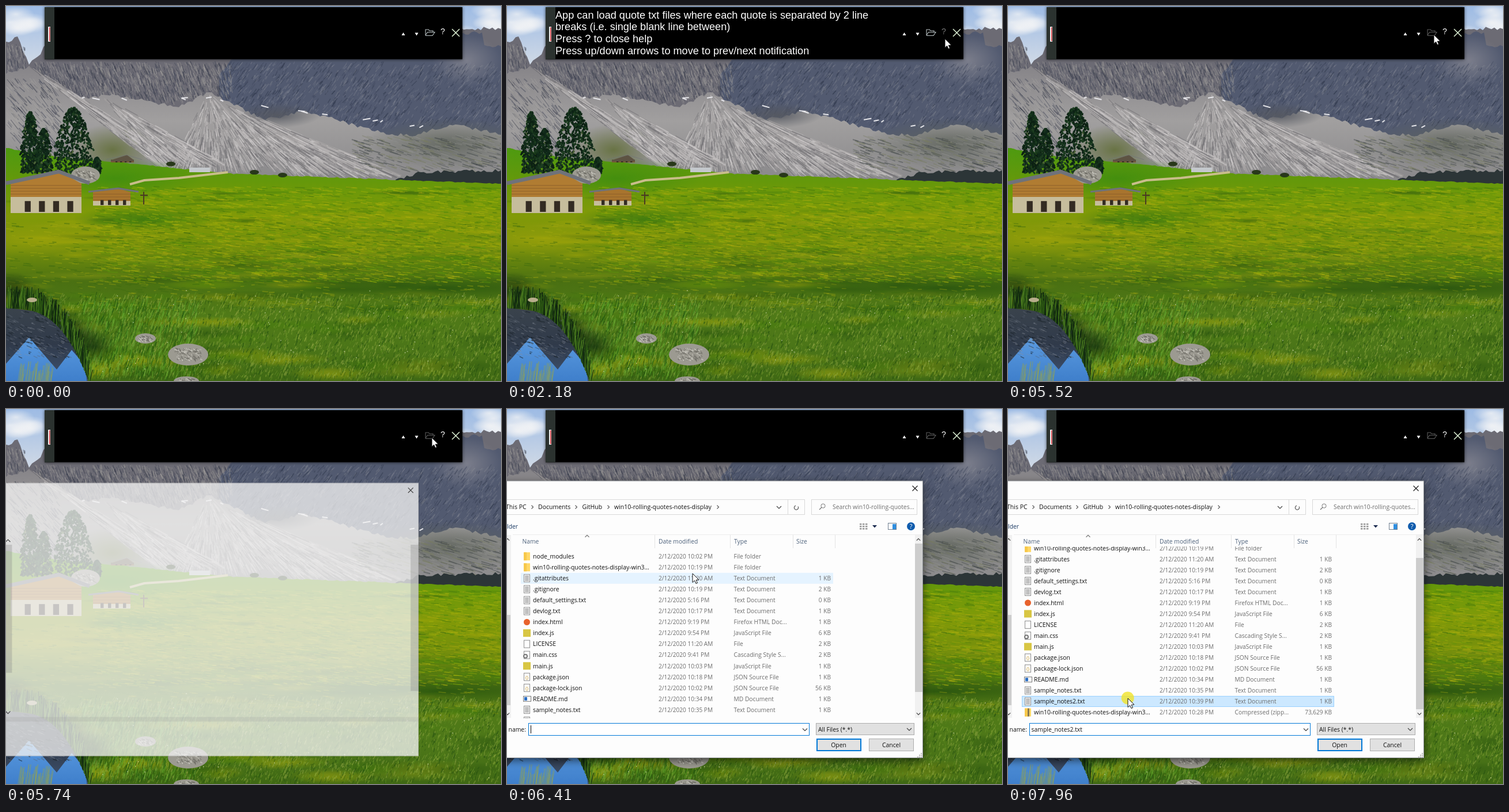
An HTML page with a canvas for the animation above (8 s loop, 859x652 px).

```html
<!DOCTYPE html>
<html lang="en">
<head>
<meta charset="utf-8">
<title>Rolling quotes</title>
<style>
html, body { margin: 0; width: 100%; height: 100%; overflow: hidden; background: #000; }
canvas { display: block; }
</style>
</head>
<body>
<canvas id="stage" width="859" height="652"></canvas>
<script>
const W = 859, H = 652, LOOP = 8000;
let g = document.getElementById('stage').getContext('2d');

let seed = 7;
const rnd = () => (seed = (seed * 16807) % 2147483647) / 2147483647;
const span = (a, b) => a + (b - a) * rnd();
const pick = list => list[Math.floor(rnd() * list.length)];

function rect(x, y, w, h, color) { g.fillStyle = color; g.fillRect(x, y, w, h); }
function frame(x, y, w, h, color, lw = 1) {
  g.strokeStyle = color; g.lineWidth = lw;
  g.strokeRect(x + lw / 2, y + lw / 2, w - lw, h - lw);
}
function box(x, y, w, h, fill, edge, lw) { rect(x, y, w, h, fill); frame(x, y, w, h, edge, lw); }
function trace(pts) {
  g.beginPath();
  for (let i = 0; i < pts.length; i += 2) g.lineTo(pts[i], pts[i + 1]);
}
function poly(color, ...pts) { trace(pts); g.closePath(); g.fillStyle = color; g.fill(); }
function line(color, lw, ...pts) { trace(pts); g.strokeStyle = color; g.lineWidth = lw; g.stroke(); }
function blob(color, x, y, rx, ry = rx) {
  g.beginPath(); g.ellipse(x, y, rx, ry, 0, 0, 7); g.fillStyle = color; g.fill();
}
function ring(color, lw, x, y, r, a = 0, b = 7) {
  g.beginPath(); g.arc(x, y, r, a, b); g.strokeStyle = color; g.lineWidth = lw; g.stroke();
}
function text(s, x, y, size, color, align = 'left', family = '"Open Sans"') {
  g.font = `${size}px ${family}, sans-serif`;
  g.fillStyle = color; g.textAlign = align; g.fillText(s, x, y);
}
function fade(y0, y1, ...colors) {
  const f = g.createLinearGradient(0, y0, 0, y1);
  colors.forEach((c, i) => f.addColorStop(i / (colors.length - 1), c));
  return f;
}
// soft-edged ellipse
function glow(rgb, a, x, y, rx, ry) {
  g.save(); g.translate(x, y); g.scale(rx, ry);
  const f = g.createRadialGradient(0, 0, 0, 0, 0, 1);
  f.addColorStop(0, `rgba(${rgb},${a})`); f.addColorStop(1, `rgba(${rgb},0)`);
  g.fillStyle = f; g.fillRect(-1, -1, 2, 2); g.restore();
}
// rough skyline through a few points, filled downwards
function ridge(color, rough, ...pts) {
  const edge = [0, H];
  for (let i = 2; i < pts.length; i += 2) {
    const [x0, y0, x1, y1] = pts.slice(i - 2, i + 2), n = Math.ceil((x1 - x0) / 5);
    for (let k = 0; k <= n; k++) {
      edge.push(x0 + (x1 - x0) * k / n, y0 + (y1 - y0) * k / n + (k % n ? span(-rough, rough) : 0));
    }
  }
  poly(color, pts[0], H, ...edge.slice(2), W, H);
}
// short strokes scattered in a box, all leaning by (dx, dy)
function strokes(n, x0, y0, x1, y1, dx, dy, colors) {
  while (n--) {
    const x = span(x0, x1), y = span(y0, y1), k = span(.3, 1);
    line(pick(colors), span(.7, 2), x, y, x + dx * k + span(-2, 2), y + dy * k + span(-1, 1));
  }
}
// gravel running from a towards b, fanning out
function flow(n, ax, ay, bx, by, spread, colors) {
  while (n--) {
    const ex = bx + span(-spread, spread), k = Math.sqrt(rnd()) * .9, j = span(-3, 3);
    const at = q => [ax + (ex - ax) * q + j, ay + (by - ay) * q];
    line(pick(colors), span(.8, 2.2), ...at(k), ...at(k + .1));
  }
}
function layer(draw) {
  const c = document.createElement('canvas'), old = g;
  c.width = W; c.height = H;
  g = c.getContext('2d'); draw(); g = old;
  return c;
}

const rock = ['#93918f77', '#35394877', '#a8a5a266', '#4d515f88'];
const shade = ['#7a808f66', '#2f374a77', '#8a8d9555', '#444b6188'];
const gravel = ['#cfcccb99', '#77757899', '#b9b6b599', '#a3a0a099'];

function mountains() {
  rect(0, 0, W, 130, fade(0, 100, '#9dbbe4', '#cfd9e6'));
  for (let i = 0; i < 14; i++) glow('240,242,245', .8, i % 2 ? span(0, 60) : span(790, W), span(5, 50), 32, 14);
  glow('80,155,235', .9, 850, 63, 35, 9);
  ridge('#6c6b74', 4, 0, 62, 20, 53, 40, 102, 60, 84, 80, 40, W, 40);
  ridge('#525a70', 3, 370, 120, 420, 60, 770, 48, 826, 46, 830, 68, W, 70);
  glow('140,140,150', .7, 800, 95, 60, 45);
  strokes(1500, 45, 96, 390, 160, 5, 14, rock);
  strokes(1500, 390, 96, W, 205, -8, 11, shade);
  strokes(100, 2, 66, 34, 112, 3, 14, rock);

  ridge(fade(100, 300, '#858387', '#a19f9f', '#8a898b'), 3, 0, 118, 40, 104, 115, 160, 190, 155,
    300, 176, 352, 150, 450, 198, 520, 182, 640, 218, 700, 226, 780, 206, W, 224);
  glow('85,88,96', .9, 470, 190, 75, 22);
  glow('95,100,92', .9, 770, 240, 150, 45);
  strokes(350, 0, 125, 90, 245, 14, 16, rock);
  glow('100,112,60', .9, 185, 250, 75, 45);
  flow(500, 40, 104, 300, 285, 30, gravel);
  flow(900, 352, 152, 390, 292, 110, gravel);
  flow(900, 380, 170, 600, 300, 100, gravel);
  flow(500, 170, 160, 330, 280, 60, gravel);
  strokes(450, 600, 224, W, 285, 22, 7, ['#90908d77', '#484d4c88', '#777d6177']);
  for (let i = 0; i < 16; i++) {
    const x = span(120, 720), y = 160 + Math.max(0, x - 350) * .14;
    line('#e6e6ea', 2, x, y, x + span(4, 14), y + span(-4, 4));
  }
  ridge('#2c3537', 3, 676, 302, 720, 289, W, 286);
}

function meadow() {
  ridge(fade(250, H, '#4f9a10', '#66980a', '#829a08', '#748e0c', '#4a7012', '#507a18', '#4b7518', '#3f6814'),
    1, 0, 247, 90, 262, 240, 276, 380, 291, W, 309);
  // light and dark bands, broader towards the viewer
  for (let i = 0; i < 170; i++) {
    const d = rnd(), y = 312 + 330 * d;
    glow(pick(['165,168,8', '70,125,12', '135,150,20', '40,82,14']), .5, span(0, W), y, span(40, 130), 3 + 10 * d);
  }
  glow('60,140,15', .8, 190, 300, 150, 36);
  glow('46,115,16', .8, 245, 370, 130, 22);
  glow('165,165,10', .5, 70, 405, 230, 32);
  glow('38,82,14', .7, 760, 490, 270, 22);
  strokes(3200, 150, 314, W, 480, 18, 2, ['#a8b40a77', '#45780c77', '#b5b01266', '#5f960c77']);
  strokes(1200, 0, 375, W, 530, 14, 1, ['#a4aa1266', '#3a6a1077']);
  strokes(5200, 90, 505, W, H, 3, -8, ['#8aa83a77', '#25501088', '#5c8a2088', '#a2b25066']);
  strokes(900, 130, 520, 330, H, 5, -18, ['#5ba02a88', '#235a1088', '#7cb34266']);
  for (let i = 0; i < 60; i++) blob('#dfe3c0aa', span(150, 840), span(490, 645), .9);
  for (const x of [286, 431, 480]) blob('#28381a', x, x / 10 + 246, 8, 4);
  line('#c9bd8b', 4, 215, 310, 240, 303, 300, 299, 385, 289);
  rect(318, 281, 36, 8, '#c4c8cc');
}

function tree(x, top, w, bottom) {
  const h = bottom - top;
  for (let i = 0; i < h * 5; i++) {
    const k = rnd(), half = w * Math.sqrt(Math.min(k * 1.6, 1)), px = span(-half, half);
    line(pick(['#0c2013', '#14301a', '#1d3d20', i % 9 ? '#10281a' : '#4d6238']), 3,
      x + px, top + k * h, x + px + span(-4, 4), top + k * h + 4);
  }
}
// gabled cabin; (x, y) is the top left of the walls
function cabin(x, y, w, h, rise, base, wood) {
  rect(x, y, w, h, wood);
  rect(x, y + h - base, w, base, '#c6bd9c');
  for (let i = 4; i < h - base; i += 5) line('#8e612a', 1, x, y + i, x + w, y + i);
  poly(wood, x, y + 1, x + w * .7, y - rise, x + w, y + 1);
  line('#6f727a', h / 8, x - 8, y, x + w * .68, y - rise, x + w + 14, y);
  for (let i = 0; i < 4; i++) rect(x + w * (.2 + i * .2), y + h * .6, w / 12, h * .36, '#332b22');
}
function boulder(x, y, rx, ry) {
  blob('#9c9a91', x, y, rx, ry);
  strokes(rx * 4, x - rx * .7, y - ry * .6, x + rx * .6, y + ry * .5, 4, 3, ['#d0cec699', '#65645e99']);
}
function village() {
  for (const [x, top, w] of [[42, 183, 15], [65, 212, 14], [117, 175, 33], [158, 262, 7]]) tree(x, top, w, 288);
  boulder(138, 294, 25, 15);
  cabin(182, 267, 40, 5, 8, 0, '#5d5343');
  cabin(8, 308, 123, 52, 20, 28, '#b07c32');
  cabin(151, 323, 65, 24, 6, 8, '#a8742e');
  line('#4a3a22', 2, 239, 345, 239, 323); line('#4a3a22', 2, 233, 329, 246, 329);
}

function pond() {
  for (let i = 0; i < 6; i++) glow('20,45,14', .75, 10 + i * 28, 492 + i * 20, 42, 30);
  poly(fade(525, H, '#3a434c', '#303a4a', '#3e5372'), 0, 524, 60, 532, 115, 568, 138, 605, 142, H, 0, H);
  poly(fade(576, H, '#5b9be0', '#3f7fcb'), 0, 622, 40, 576, 88, 632, 114, 598, 138, 626, 140, H, 0, H);
  strokes(220, 0, 530, 105, 610, 9, 4, ['#8b929a66', '#1a232a99', '#5b626f77']);
  for (let i = 0; i < 300; i++) {
    const k = rnd(), x = 145 * k, y = 512 + 130 * k ** 3;
    line(pick(['#2a5413', '#4c7c20', '#173310', '#0f2410']), 1.3, x, y + 14, x + span(-4, 8), y - span(8, 28));
  }
  strokes(50, 20, H, 80, H, 5, -35, ['#8aa06088']);
  blob('#b8ae8c', 45, 511, 9, 4);
  boulder(316, 606, 35, 19); boulder(242, 578, 18, 9); boulder(313, 652, 22, 8);
}

const scene = layer(() => { mountains(); meadow(); village(); pond(); });

function chevron(x, y, r, dir, color = '#444') {
  line(color, 1.2, x - r, y - dir * r / 2, x, y + dir * r / 2, x + r, y - dir * r / 2);
}
function cross(x, y, r, color, lw) {
  line(color, lw, x - r, y - r, x + r, y + r); line(color, lw, x + r, y - r, x - r, y + r);
}

const help = ['App can load quote txt files where each quote is separated by 2 line',
  'breaks (i.e. single blank line between)', 'Press ? to close help',
  'Press up/down arrows to move to prev/next notification'];
const ARIAL = '"Liberation Sans"';

function bar(t, cur) {
  g.save(); g.shadowColor = '#000a'; g.shadowBlur = 5;
  rect(67, 2, 725, 90.5, '#000'); g.restore();
  rect(67, 2, 17, 90.5, '#2b322f');
  rect(73, 36, 4, 26, '#f4f4f4'); rect(75, 37, 1.4, 24, '#d02028');
  poly('#fff', 686.5, 51, 692.5, 51, 689.5, 46); poly('#fff', 709.5, 46.5, 715.5, 46.5, 712.5, 51.5);
  const overHelp = cur && cur.y < 66 && cur.x > 749;
  const overOpen = t >= 4600 && (t >= 5840 || cur.x < 748);
  const c = overOpen ? '#5c5c5c' : '#b9c2c4';
  line(c, 1.1, 728, 51, 728, 41, 733, 41, 735, 43, 741, 43, 741, 45);
  line(c, 1.1, 728, 51, 731.5, 45.5, 744, 45.5, 740, 51.5, 728, 51.5);
  text('?', 758, 49, 14, overHelp ? '#777' : '#fff', 'center', ARIAL);
  cross(780.5, 46.5, 6.5, '#d9ecd0', 1.6);
  if (t >= 2100 && t < 3950) help.forEach((s, i) => text(s, 84, 21.5 + i * 20.8, 18.14, '#fff', 'left', ARIAL));
}

const LONG = 'win10-rolling-quotes-notes-display-win3...';
const kinds = {
  dir: 'File folder', txt: 'Text Document', web: 'Firefox HTML Doc...', js: 'JavaScript File', file: 'File',
  css: 'Cascading Style S...', json: 'JSON Source File', md: 'MD Document', zip: 'Compressed (zipp...'
};
const files = `dir|${LONG.slice(0, 0)}node_modules|10:02 PM|
dir|${LONG}|10:19 PM|
txt|.gitattributes|11:20 AM|1 KB
txt|.gitignore|10:19 PM|2 KB
txt|default_settings.txt|5:16 PM|0 KB
txt|devlog.txt|10:17 PM|1 KB
web|index.html|9:19 PM|1 KB
js|index.js|9:54 PM|6 KB
file|LICENSE|11:20 AM|2 KB
css|main.css|9:41 PM|2 KB
js|main.js|10:03 PM|1 KB
json|package.json|10:18 PM|1 KB
json|package-lock.json|10:02 PM|56 KB
md|README.md|10:34 PM|1 KB
txt|sample_notes.txt|10:35 PM|1 KB
txt|sample_notes2.txt|10:39 PM|1 KB
zip|${LONG}|10:28 PM|73,629 KB`.replace('${LONG.slice(0, 0)}', '').split('\n').map(s => s.split('|'));
const CHOSEN = 'sample_notes2.txt', ROW = 19.05;

function icon(kind, y) {
  if (kind === 'dir' || kind === 'zip') {
    rect(29, y - 7, 11, 14, '#ffd868'); rect(29, y - 7, 5, 14, '#f7c84a');
    if (kind === 'zip') rect(34, y - 7, 3, 14, '#8a7a50');
  } else if (kind === 'js') rect(28, y - 6.5, 13, 13, '#d8c644');
  else if (kind === 'web') blob('#e8622c', 34.5, y, 5.5);
  else if (kind === 'md') {
    box(28, y - 5, 14, 10, '#fff', '#777'); rect(30, y - 3, 5, 6, '#2c6fc4');
  } else {
    box(29, y - 7, 11, 14, '#fff', '#8c8c8c');
    if (kind === 'txt') for (let i = -4; i <= 4; i += 2) line('#777', .9, 31, y + i, 38, y + i);
    if (kind === 'json') text('{}', 34.5, y + 3, 8, '#c09020', 'center');
    if (kind === 'css') ring('#777', 2, 32, y + 2, 3);
  }
}

function list(t, cur) {
  const shift = t >= 7180 ? 33.5 : 0, dim = '#6d6d6d';
  g.save(); g.beginPath(); g.rect(10, 239, 697, 299); g.clip();
  files.forEach(([kind, name, time, size], i) => {
    const y = 256.2 + i * ROW - shift, top = y - ROW / 2, base = y + 3.8;
    if (name === CHOSEN && t >= 7960) box(24, top, 542, ROW, '#cce8ff', '#99d1ff');
    else if (cur.x < 566 && cur.y >= top && cur.y < top + ROW) rect(24, top, 542, ROW, '#e5f3ff');
    icon(kind, y);
    text(name, 45, base, 10.4, '#111');
    text('2/12/2020 ' + time, 263, base, 10.1, dim);
    text(kinds[kind], 393.5, base, 10.25, dim);
    text(size, 562, base, 10.1, dim, 'right');
  });
  g.restore();
  rect(708, 219, 13, 318, '#f1f1f1');
  rect(708, shift ? 259 : 234, 13, shift ? 263 : 258, '#cdcdcd');
  chevron(714, 227, 3.2, -1); chevron(714, 530, 3.2, 1);
}

const chrome = layer(() => {
  g.save(); g.shadowColor = '#0009'; g.shadowBlur = 14; g.shadowOffsetY = 4;
  rect(-20, 125, 742, 482, '#fdfdfd'); g.restore();
  frame(-20, 124.5, 742, 482.5, '#8c9094');
  cross(708, 138, 4.5, '#222', 1.2);

  frame(-5, 157, 522, 27, '#d9d9d9'); rect(487, 158, 1, 25, '#d9d9d9');
  const path = { 'This PC': -2, Documents: 54, GitHub: 130.5, 'win10-rolling-quotes-notes-display': 186 };
  for (const s in path) text(s, path[s], 174, 10.5, '#111');
  for (const x of [44, 120, 176, 366]) line('#555', 1.1, x - 1.5, 167.5, x + 1.5, 170.5, x - 1.5, 173.5);
  chevron(472, 171, 4, 1);
  ring('#555', 1.2, 502, 171.5, 3.6, -.6, 4.4);
  frame(528, 157, 184, 27, '#d9d9d9');
  ring('#777', 1, 548.5, 168.5, 3.6); line('#777', 1.2, 546, 171, 542, 175);
  text('Search win10-rolling-quotes...', 565, 174, 10.3, '#6d6d6d');

  text('lder', 0, 208, 10.4, '#1a3a63');
  for (let i = 0; i < 9; i++) rect(612 + i % 3 * 5, 199 + Math.floor(i / 3) * 4, 3.5, 2.5, '#999');
  poly('#1c2c50', 634, 202, 642, 202, 638, 206.5);
  box(661, 198, 15, 12, '#fff', '#6f7f90'); rect(669, 200, 6, 9, '#2f8fe0');
  blob('#0f5cad', 701, 204, 7); text('?', 701, 208, 11, '#fff', 'center');

  rect(10, 218, 711, 1, '#ececec');
  const heads = { Name: 26.5, 'Date modified': 263, Type: 394, Size: 502 };
  for (const s in heads) text(s, heads[s], 234, 10.3, '#4c607a');
  for (const x of [256, 387, 496, 569]) rect(x, 219, 1, 23, '#e4e4e4');
  chevron(139, 221, 3.5, -1, '#777');
  rect(0, 219, 7, 318, '#f1f1f1'); rect(0, 358, 6, 157, '#cdcdcd');
  chevron(1, 227, 3.2, -1); chevron(1, 530, 3.2, 1);

  text('name:', 2.5, 560.5, 10.4, '#111');
  box(37, 546, 488, 22, '#fff', '#0078d7'); chevron(517, 557.5, 4, 1);
  box(536, 546, 171, 21, '#e1e1e1', '#adadad'); chevron(698, 557, 4, 1);
  text('All Files (*.*)', 540, 560.5, 10.4, '#111');
  box(537, 573, 78, 22, '#e1e1e1', '#0078d7', 2); text('Open', 575.5, 587.5, 10.4, '#111', 'center');
  box(628, 573, 78, 22, '#e1e1e1', '#adadad'); text('Cancel', 667, 587.5, 10.4, '#111', 'center');
  for (let i = 0; i < 3; i++) for (let j = 0; j <= i; j++) rect(718 - j * 3, 598 + i * 3, 2, 2, '#b5b5b5');
});

// the empty window while it fades and grows in
function ghost(k, alpha) {
  g.save(); g.globalAlpha = alpha;
  g.translate(308, 366); g.scale(k, k); g.translate(-308, -366);
  rect(-20, 125, 742, 482, 'rgba(244,244,244,.77)');
  frame(-20, 125, 742, 482, 'rgba(120,120,120,.25)');
  cross(708, 138, 4.5, '#444', 1.2);
  for (const x of [-8, 708]) rect(x, 234, 14, x < 0 ? 226 : 258, 'rgba(130,130,130,.3)');
  rect(-10, 538, 732, 8, 'rgba(150,150,150,.2)');
  chevron(-1, 227, 4, -1); chevron(-1, 530, 4, 1);
  g.restore();
}

function dialog(t, cur) {
  if (t < 5610) return;
  if (t < 5740) return ghost(.955, .4);
  if (t < 5840) return ghost(.9855, 1);
  g.drawImage(chrome, 0, 0);
  list(t, cur);
  if (t >= 7960) text(CHOSEN, 40.5, 560.5, 10.4, '#111');
  else if (Math.floor((t - 5860) / 530) % 2 === 1) rect(41, 550, 1, 14, '#000');
}

// start, end, steps, destination
const moves = [
  [300, 1090, 8, 760, 57], [4500, 4820, 4, 739, 50], [5950, 6050, 2, 565, 146],
  [6190, 6410, 3, 322, 286], [6530, 6960, 5, 250, 410], [7430, 7730, 4, 208, 503]
];
function cursorAt(t) {
  if (t < 300) return null;
  let x = 744, y = 596;
  for (const [a, b, n, tx, ty] of moves) {
    if (t < a) break;
    const k = t >= b ? 1 : (Math.floor((t - a) / (b - a) * (n - 1)) + 1) / n;
    const e = k * (2 - k);
    x += (tx - x) * e; y += (ty - y) * e;
  }
  return { x, y };
}
const clicks = [[1950, 2180], [3620, 3950], [5080, 5290], [7960, LOOP]];

function pointer(t, cur) {
  if (!cur) return;
  if (clicks.some(([a, b]) => t >= a && t < b)) blob('rgba(240,226,40,.8)', cur.x - .3, cur.y - .5, 11);
  g.save(); g.translate(cur.x, cur.y);
  poly('#fff', 0, 0, 0, 15.5, 3.6, 12.2, 6, 17.5, 8.5, 16.4, 6.2, 11.3, 11, 11);
  g.strokeStyle = '#111'; g.lineWidth = 1; g.stroke();
  g.restore();
}

function draw(t) {
  const cur = cursorAt(t);
  g.drawImage(scene, 0, 0);
  dialog(t, cur);
  bar(t, cur);
  pointer(t, cur);
}

const start = performance.now();
function tick() {
  draw((performance.now() - start) % LOOP);
  requestAnimationFrame(tick);
}
tick();
</script>
</body>
</html>
```
